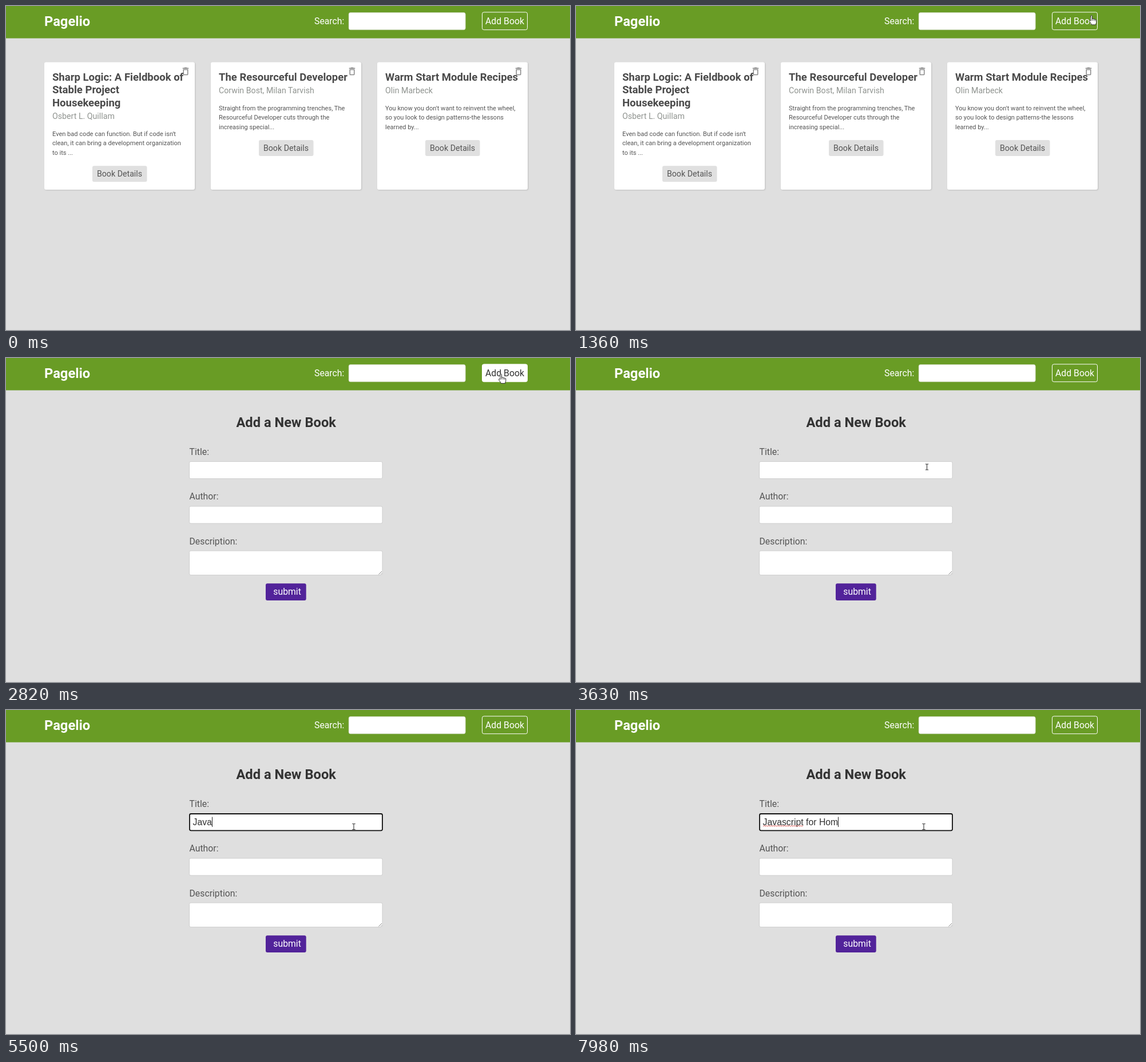
Animation of 986x568 px, one loop 8 s. Source, as an HTML page:

```html
<!DOCTYPE html>
<html lang="en">
<head>
<meta charset="utf-8">
<title>Book list</title>
<style>
  html, body { margin: 0; width: 100%; height: 100%; overflow: hidden; background: #dfdfdf; }
  svg { display: block; width: 986px; height: 568px; font-family: Roboto, sans-serif; }
  text { white-space: pre; }
  .card { filter: drop-shadow(1px 1px 1.2px rgba(0, 0, 0, .14)); }
  .typed { font-family: "Liberation Sans", Arial, sans-serif; }
</style>
</head>
<body>
<svg id="stage" viewBox="0 0 986 568"></svg>
<script>
const LOOP = 8000;
const REM = 15.8;

const rect = (x, y, w, h, fill, attrs = '') =>
  `<rect x="${x}" y="${y}" width="${w}" height="${h}" fill="${fill}" ${attrs}/>`;
const text = (x, y, size, fill, content, attrs = '') =>
  `<text x="${x}" y="${y}" font-size="${size}" fill="${fill}" ${attrs}>${content}</text>`;
const lines = (x, y, gap, size, fill, rows, attrs) =>
  rows.map((row, i) => text(x, y + i * gap, size, fill, row, attrs)).join('');
const BOLD = 'font-weight="700"';
const MIDDLE = 'text-anchor="middle"';

const books = [
  { title: ['Sharp Logic: A Fieldbook of', 'Stable Project', 'Housekeeping'],
    author: 'Osbert L. Quillam',
    about: ["Even bad code can function. But if code isn't", 'clean, it can bring a development organization', 'to its ...'] },
  { title: ['The Resourceful Developer'],
    author: 'Corwin Bost, Milan Tarvish',
    about: ['Straight from the programming trenches, The', 'Resourceful Developer cuts through the', 'increasing special...'] },
  { title: ['Warm Start Module Recipes'],
    author: 'Olin Marbeck',
    about: ["You know you don't want to reinvent the wheel,", 'so you look to design patterns-the lessons', 'learned by...'] }
];

const BIN = 'M6 19c0 1.1.9 2 2 2h8c1.1 0 2-.9 2-2V7H6zM8 9h8v10H8zm7.5-5-1-1h-5l-1 1H5v2h14V4z';

function card({ title, author, about }, i) {
  const x = 67 + i * 291;
  const drop = (title.length - 1) * 22.6;
  return rect(x, 98.5, 263, 223.5, '#fff', 'rx="3" class="card"')
    + lines(x + 14, 130.5, 22.6, 18.5, '#4a4a4a', title, BOLD)
    + text(x + 14, 153 + drop, 14.2, '#909490', author)
    + lines(x + 14, 182.6 + drop, 16.6, 11.06, '#555', about)
    + rect(x + 84, 235 + drop, 95.5, 28, '#e0e0e0', 'rx="3"')
    + text(x + 131.5, 254 + drop, 14.2, '#555', 'Book Details', MIDDLE)
    + `<path d="${BIN}" fill="#888" fill-rule="evenodd" transform="translate(${x + 238} 105.5) scale(.75)"/>`;
}

const field = (y, h) => rect(320.5, y + .5, 337.5, h, '#fff', 'rx="2.5" stroke="#cecece"');
const squiggle = 'M327 204' + Array.from({ length: 35 }, (_, i) => `L${329 + i * 2} ${i % 2 ? 204 : 202.6}`).join('');

document.getElementById('stage').innerHTML =
  rect(0, 0, 986, 568, '#dfdfdf')
  + rect(0, 0, 986, 56.6, '#699c25')
  + text(67, 35.2, 1.5 * REM, '#fff', 'Pagelio', BOLD)
  + text(539, 31.8, REM, '#fff', 'Search:')
  + rect(599.2, 11.6, 204, 30.1, '#fff', 'rx="3" stroke="#ccd6bd" stroke-width=".8"')
  + rect(832.5, 10.9, 79, 30.8, '#fff', 'id="addFill" rx="3" stroke="#fff"')
  + text(872, 31.8, REM, '#fff', 'Add Book', `id="addText" ${MIDDLE}`)
  + `<g id="list">${books.map(card).join('')}</g>`
  + '<g id="form">'
  + text(489.7, 121.3, 1.5 * REM, '#333', 'Add a New Book', `${BOLD} ${MIDDLE}`)
  + lines(320.5, 170, 78.3, REM, '#555', ['Title:', 'Author:', 'Description:'])
  + field(181, 30) + field(259.5, 30) + field(337.5, 42.5)
  + '<path d="M651.5 379.5l5.5-5.5M655 379.5l2-2" stroke="#777" stroke-width=".9"/>'
  + rect(454, 395.3, 70.7, 29.7, '#52239a', 'rx="3"')
  + text(491.6, 415.4, REM, '#fff', 'submit', MIDDLE)
  + rect(321, 182, 337, 29.3, 'none', 'id="focus" rx="2.5" stroke="#111" stroke-width="1.8"')
  + text(326.6, 201.8, REM, '#333', '', 'id="typed" class="typed"')
  + `<path id="squiggle" d="${squiggle}" fill="none" stroke="#e2504a" stroke-width=".9"/>`
  + rect(0, 187.5, 1, 17.5, '#222', 'id="caret"')
  + '</g>'
  + '<g id="pointer"><circle id="glow" cx="-.7" cy=".3" r="9" fill="#f4ea1c" fill-opacity=".72"/>'
  + '<path id="arrow" d="M0 0V14.5L3.4 11.4 5.7 16.6 8 15.6 5.7 10.5H10.2Z" fill="#fff" stroke="#222" stroke-width=".9"/>'
  + '<g id="hand"><path d="M-1.5 .7C-1.5-.8 1-.8 1 .7V6C1.6 5 3.5 5.2 3.7 6.4 4.4 5.6 6 5.9 6.2 7.1 7 6.4 8.3 7 8.3 8.2V11.3C8.3 13 7.2 13.5 7.2 15.9H-.3C-.5 13.6-3 12-4 9.6-4.5 8-2.8 7.6-1.5 9.2Z" fill="#fff" stroke="#222" stroke-width=".95"/>'
  + '<path d="M1 6V9M3.7 6.5V9.2M6.2 7.2V9.5" stroke="#222" stroke-width=".8"/></g>'
  + '<path id="beam" d="M-2.7-5H-.7L0-4.4 .7-5H2.7M-2.7 5H-.7L0 4.4 .7 5H2.7M0-4.4V4.4" fill="none" stroke="#333" stroke-width="1.1"/></g>';

const el = Object.fromEntries([...document.querySelectorAll('[id]')].map(node => [node.id, node]));
const show = (node, visible) => { node.style.display = visible ? '' : 'none'; };
const ramp = (t, from, to) => Math.min(1, Math.max(0, (t - from) / (to - from)));
const mix = (a, b, k) => a + (b - a) * k;

// Pointer path: time, x, y
const path = [
  [450, 972, 541], [800, 948, 180], [1070, 925, 14], [1150, 917, 2], [1212, 912, 5],
  [1351, 901.5, 17], [1628, 865.5, 28.5], [3081, 865.5, 28.5], [3150, 862, 31],
  [3300, 800, 75], [3500, 640, 172], [3629, 613.5, 191], [4231, 613.5, 191], [4368, 608, 204.5]
];

function pointerAt(t) {
  const next = path.findIndex(key => key[0] > t);
  if (next < 0) return path[path.length - 1].slice(1);
  const [a, b] = [path[Math.max(0, next - 1)], path[next]];
  const k = ramp(t, a[0], b[0]);
  return [mix(a[1], b[1], k), mix(a[2], b[2], k)];
}

// Screen updates arrive in discrete steps from the start of each movement
function snap(t) {
  const start = [450, 3150, 4300].filter(s => s <= t).pop();
  if (start === undefined) return t;
  const step = start === 450 ? 69.3 : 68.5;
  return start + Math.floor((t - start) / step) * step;
}

const phrase = 'Javascript for Hom';
const keyTimes = [4960, 5100, 5370, 5500, 5830, 5980, 6240, 6380, 6510, 6650,
  6850, 6980, 7120, 7180, 7320, 7580, 7710, 7980];

function drawPointer(t) {
  const [x, y] = pointerAt(snap(t));
  const onButton = x >= 832 && x < 912 && y >= 10 && y <= 42;
  const onTitle = t >= 2820 && x >= 320 && x <= 658 && y >= 181 && y <= 212;
  el.pointer.setAttribute('transform', `translate(${x} ${y})`);
  show(el.pointer, t >= 450);
  show(el.hand, onButton);
  show(el.beam, onTitle);
  show(el.arrow, !onButton && !onTitle);
  show(el.glow, (t >= 2690 && t < 2820) || (t >= 3830 && t < 4030));
}

function drawButton(t) {
  const s = snap(t);
  const hover = ramp(s, 1355, 1600) - ramp(s, 3200, 3480);
  const shade = Math.round(mix(255, 51, hover));
  el.addFill.setAttribute('fill-opacity', hover);
  el.addText.setAttribute('fill', `rgb(${shade},${shade},${shade})`);
}

function drawForm(t) {
  const count = keyTimes.filter(time => time <= t).length;
  const focused = t >= 3830;
  const blinkOn = t < 4365 || t >= 4900;
  if (el.typed.textContent.length !== count) el.typed.textContent = phrase.slice(0, count);
  const width = count ? el.typed.getComputedTextLength() : 0;
  el.caret.setAttribute('x', Math.floor(326.9 + width));
  show(el.focus, focused);
  show(el.caret, focused && blinkOn);
  show(el.squiggle, count > 10);
}

function draw() {
  const t = performance.now() % LOOP;
  const adding = t >= 2820;
  show(el.list, !adding);
  show(el.form, adding);
  drawButton(t);
  drawForm(t);
  drawPointer(t);
  requestAnimationFrame(draw);
}
draw();
</script>
</body>
</html>
```
